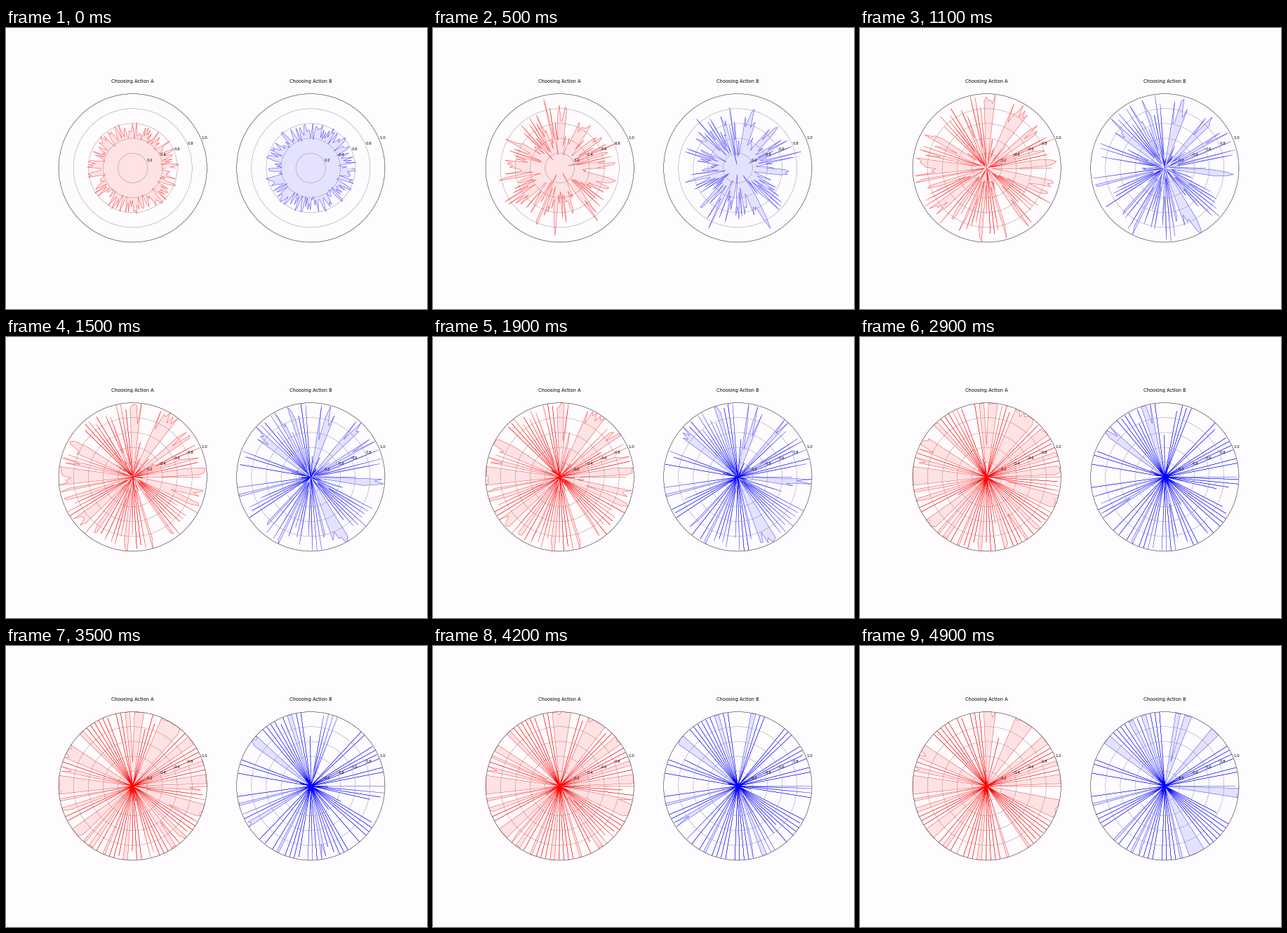
These frames come from a looping animation (600x400 px, 5000 ms). A matplotlib script:

```python
import numpy as np
import matplotlib.pyplot as plt
from matplotlib.animation import FuncAnimation

W, H, DPI = 600, 400, 40
FRAMES, INTERVAL = 50, 100
AGENTS = 200
DIAMETER, CENTER_Y = 211.36, 199.3
CENTERS_X = (180.7, 434.3)

plt.rcParams["font.family"] = "DejaVu Sans"

# Sectors in degrees: agreed on A, agreed on B, and B with a spell of A.
A_SECTORS = [(0.5, 7.5), (33, 41), (52, 67), (83, 90.5), (147, 158.5),
             (163, 169.5), (173, 187), (333, 350)]
B_SECTORS = [(139, 146)]
SWING_SECTORS = [(42, 50), (70, 82), (289, 303), (351, 360)]

rng = np.random.default_rng(12)
theta = np.linspace(0, 2 * np.pi, AGENTS)
index = np.arange(AGENTS)


def inside(sectors):
    degrees = np.degrees(theta)
    return np.any([(degrees > a) & (degrees < b) for a, b in sectors], axis=0)


# Neighbours take opposite actions, apart from the sectors and a few strays.
stray = rng.random(AGENTS) < 0.1
side = np.where((index % 2 == 1) ^ stray, 1.0, -1.0)
swings = (side < 0) & (rng.random(AGENTS) < 0.15)
in_swing = inside(SWING_SECTORS)
swings = np.where(in_swing, index % 2 == 1, swings)
side[inside(B_SECTORS) | in_swing] = -1
in_a = inside(A_SECTORS)
side[in_a] = 1
swings = swings & ~in_a & ~inside(B_SECTORS)

noise = rng.uniform(-0.5, 0.5, AGENTS)
strength = np.exp(rng.normal(0, 0.45, AGENTS))
wander = np.where(rng.random(AGENTS) < 0.08, 1.2, 0.4)
speed = rng.uniform(0.8, 2.5, AGENTS)
phase = rng.uniform(0, 2 * np.pi, AGENTS)
swing_start = rng.normal(2.15, 0.2, AGENTS)
swing_end = rng.normal(4.3, 0.25, AGENTS)


def sigmoid(x):
    return 1 / (1 + np.exp(-x))


def chance_of_a(t):
    """Probability of action A for every agent at t seconds."""
    window = sigmoid((t - swing_start) / 0.1) * sigmoid((swing_end - t) / 0.1)
    leaning = np.where(swings, 2 * window - 1, side)
    drift = wander * np.sin(speed * t + phase)
    gain = 1.55 * t ** 1.25
    return sigmoid(noise + gain * strength * (leaning + drift))


fig = plt.figure(figsize=(W / DPI, H / DPI), dpi=DPI, facecolor="#fefcfe")


def make_panel(center_x, title, color):
    left = center_x - DIAMETER / 2
    bottom = H - CENTER_Y - DIAMETER / 2
    ax = fig.add_axes([left / W, bottom / H, DIAMETER / W, DIAMETER / H],
                      projection="polar", facecolor="none")
    ax.set_axisbelow(False)
    ax.set_xticks([])
    ax.set_yticks([0.2, 0.4, 0.6, 0.8, 1.0])
    ax.grid(color="#888888", lw=0.8)
    fig.text(center_x / W, 1 - 78 / H, title, size=12,
             ha="center", va="baseline")
    line, = ax.plot(theta, np.zeros(AGENTS), color=color, lw=0.6)
    area, = ax.fill(theta, np.zeros(AGENTS), color=color, alpha=0.1)
    ax.set_ylim(0, 1)
    return line, area


panels = [
    make_panel(CENTERS_X[0], "Choosing Action A", "red"),
    make_panel(CENTERS_X[1], "Choosing Action B", "blue"),
]


def update(frame):
    a = chance_of_a(frame * INTERVAL / 1000)
    for (line, area), radius in zip(panels, (a, 1 - a)):
        line.set_ydata(radius)
        area.set_xy(np.column_stack([theta, radius]))
    return [artist for panel in panels for artist in panel]


animation = FuncAnimation(fig, update, frames=FRAMES, interval=INTERVAL,
                          repeat=True, repeat_delay=0)
plt.show()
```
